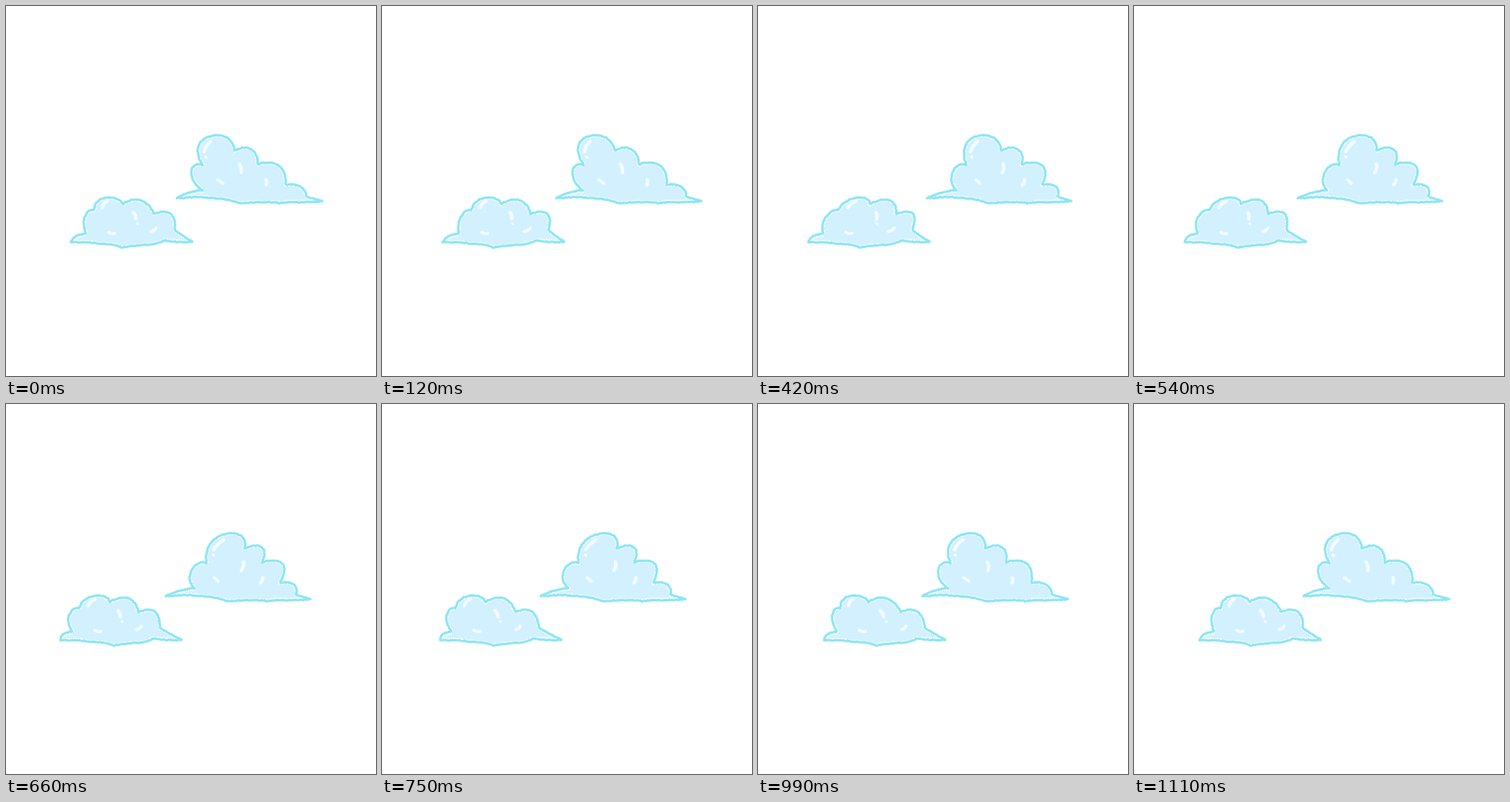
An HTML page that plays this animation: 480 px wide and 480 px high, repeating every 1140 ms.

```html
<!DOCTYPE html>
<html lang="en">
<head>
<meta charset="utf-8">
<title>Swaying clouds</title>
<style>
  html, body { margin: 0; width: 100%; height: 100%; overflow: hidden; background: #fff; }
  svg { display: block; width: 100vw; height: 100vh; }
  path { fill: none; stroke-linecap: round; stroke-linejoin: round; }
</style>
</head>
<body>
<svg id="stage" viewBox="0 0 480 480"></svg>
<script>
const LOOP = 1140, STEP = 30;
const SWAY = 10.5, PEAK = 185, PEAK_Y = 250;
const NS = 'http://www.w3.org/2000/svg';
const stage = document.getElementById('stage');

const clouds = [
  {
    wavelength: 262,
    outline: `M222 249 C232 243 243 239.5 255 239 C244 233 238.5 220 240.5 213
      C241.5 207 247 204.5 255 206 C246 193 247.5 181 254.5 174.5 C261 168 274 165.5 284 169.5
      C291 172.5 295 179 297 188 C303 182.5 313 182.5 319 186.5 C325 191 327 198 327 206
      C335 201.5 347 202 354 207 C361 212 363 222 363 232 C373 230 381 233 385 237
      C388 240 390 244 390 247 C396 250 403 251 411 253 C395 256 375 253 355 256
      C340 253 320 255 303 256 C290 250 265 249 250 248 C240 247 230 250 222 249Z`,
    specks: ['M229 247 Q242 242 257 242', 'M236 246 L262 246', 'M362 252 L402 252'],
    shines: [
      ['M265.5 176 Q259 181 257 189', 4.5], ['M259 195.5 L260 196.5', 3.5],
      ['M302.5 205 Q306 210 305 216', 4.5], ['M274.5 225.5 L281.5 230', 4],
      ['M337.5 225.5 Q339 229 337.5 232', 4.5]
    ]
  },
  {
    wavelength: 220,
    outline: `M84 306 C87 299 96 296 104 295 C100 287 100 277 104 270
      C106 266 110 264 114 265 C114 257 120 249 131 248.5 C141 248 148 251 152 257
      C158 251 170 249 179 254 C186 258 190 264 191 270 C198 266 209 266 214 270
      C219 275 220 283 219 290 C225 296 233 300 242 306 C230 307 215 306 206 304
      C193 310 180 310 168 311 C160 311 155 314 149 313 C142 309 130 309 118 308
      C105 306 95 307 84 306Z`,
    specks: ['M89 303 Q96 299 104 299', 'M90 304 L112 304.5', 'M212 302 L235 304'],
    shines: [
      ['M131.5 253 Q126 256 125 261.5', 4.5], ['M144.5 252.5 L146 253.5', 3],
      ['M165 268 Q168.5 271 168.5 276', 4.5], ['M170.5 282 L171 282.5', 3.5],
      ['M133 293.5 Q137 296 141 295', 4], ['M188 292.5 Q193 291.5 195 288', 4]
    ]
  }
];

// Rows sway sideways; the wave travels upward.
function sway(y, t, wavelength) {
  const phase = (t - PEAK) / LOOP + (y - PEAK_Y) / wavelength;
  return SWAY * Math.cos(2 * Math.PI * phase);
}

let seed = 7;
function random() {
  seed = (seed * 16807) % 2147483647;
  return seed / 2147483647;
}

function sample(d, rough, wavelength) {
  const path = document.createElementNS(NS, 'path');
  path.setAttribute('d', d);
  const length = path.getTotalLength();
  const count = Math.max(2, Math.round(length / 1.8));
  const wobble = () => (random() - 0.5) * rough;
  return Array.from({ length: count + 1 }, (_, i) => {
    const p = path.getPointAtLength(length * i / count);
    return { x: p.x + wobble() - sway(p.y, 0, wavelength), y: p.y + wobble() };
  });
}

const parts = [];
function add(points, wavelength, attrs) {
  const node = document.createElementNS(NS, 'path');
  for (const key in attrs) node.setAttribute(key, attrs[key]);
  stage.appendChild(node);
  parts.push({ node, points, wavelength });
}

const speck = (width, dash) => ({
  stroke: '#fff', 'stroke-width': width, 'stroke-dasharray': dash,
  style: 'stroke-linecap:butt'
});

for (const { outline, specks, shines, wavelength } of clouds) {
  const edge = sample(outline, 1, wavelength);
  const line = (d, rough, attrs) => add(sample(d, rough, wavelength), wavelength, attrs);
  add(edge, wavelength, { style: 'fill:#d3f0ff' });
  add(edge, wavelength, speck(5.6, '1.3 1.8'));
  specks.forEach(d => line(d, 0.6, speck(1.6, '1.5 1.5')));
  shines.forEach(([d, width]) => line(d, 0, { stroke: '#f3fbff', 'stroke-width': width }));
  add(edge, wavelength, { stroke: '#8ce6f4', 'stroke-width': 3 });
}

function draw(time) {
  const t = Math.floor((time % LOOP) / STEP) * STEP;
  for (const { node, points, wavelength } of parts) {
    const line = points.map(p =>
      (p.x + sway(p.y, t, wavelength)).toFixed(2) + ' ' + p.y.toFixed(2));
    node.setAttribute('d', 'M' + line.join('L'));
  }
}

const start = performance.now();
function tick() {
  draw(performance.now() - start);
  requestAnimationFrame(tick);
}
tick();
</script>
</body>
</html>
```
